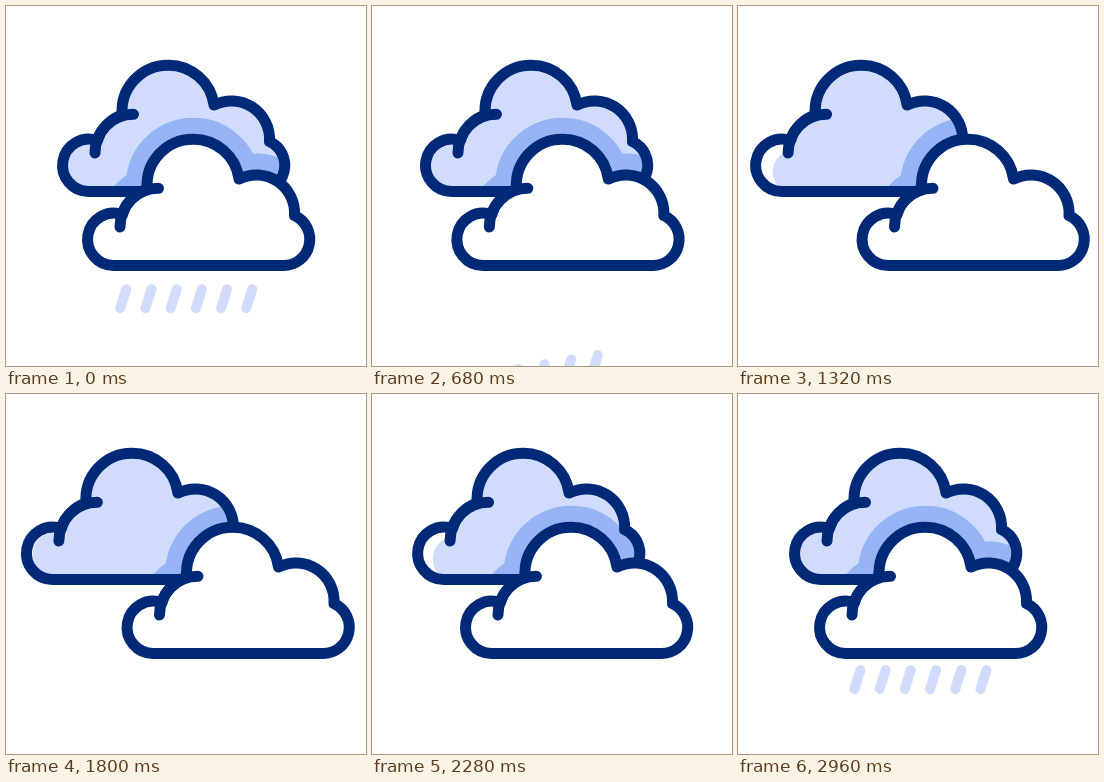
An HTML page that plays this animation: 360 by 360 pixels, repeating every 3000 ms.

```html
<!DOCTYPE html>
<html>
<head>
<meta charset="utf-8">
<style>
  html, body { margin: 0; width: 100%; height: 100%; overflow: hidden; background: #fff; }
  svg { display: block; width: 100vw; height: 100vh; }
  .line { fill: none; stroke: #002a77; stroke-width: 11; stroke-linecap: round; stroke-linejoin: round; }
</style>
</head>
<body>
<svg viewBox="0 0 360 360">
  <defs>
    <path id="body" d="M107.700 259.500A26.200 26.200 0 1 1 116.500 208.600A38.500 38.500 0 0 1 141.200 183A46 46 0 0 1 187 133.200A46 46 0 0 1 233 173A38.300 38.300 0 0 1 288.500 209.500A26.200 26.200 0 0 1 277 259.500Z"/>
    <path id="curl" d="M114 221A38.500 38.500 0 0 1 152.500 182.300"/>
    <clipPath id="backClip"><use id="clipBody" href="#body"/></clipPath>
  </defs>
  <g id="rain" stroke="#d1dcfc" stroke-width="10" stroke-linecap="round"></g>
  <g clip-path="url(#backClip)">
    <rect width="360" height="360" fill="#d1dcfc"/>
    <g id="lobe">
      <rect x="45" y="130" width="44" height="60" fill="#fff"/>
      <circle id="shade" r="22" fill="#d1dcfc"/>
    </g>
    <use id="shadow" href="#body" fill="none" stroke="#96b3f3" stroke-width="43" stroke-linejoin="round"/>
  </g>
  <g id="back" class="line"><use href="#body"/><use href="#curl"/></g>
  <g id="front" class="line"><use href="#body" fill="#fff"/><use href="#curl"/></g>
</svg>
<script>
const LOOP = 3000, DROPS = 6;
const el = id => document.getElementById(id);
const clamp = u => Math.max(0, Math.min(1, u));
const smooth = u => (u = clamp(u), u * u * (3 - 2 * u));
const move = (id, x, y) => el(id).setAttribute('transform', `translate(${x} ${y})`);

const drops = Array.from({ length: DROPS }, (_, i) => {
  const line = document.createElementNS('http://www.w3.org/2000/svg', 'line');
  const x = 120.3 + 25.2 * i;
  for (const [key, value] of Object.entries({ x1: x, y1: 283, x2: x - 6, y2: 302 })) line.setAttribute(key, value);
  el('rain').append(line);
  return line;
});

// 0 when the clouds are together, 1 when they are furthest apart
const spread = t => t < 1510 ? smooth((t - 520) / 990) : 1 - smooth((t - 1510) / 1150);

// Smooth interpolation through [time, value] stops
function track(stops, t) {
  const i = Math.max(1, stops.findIndex(s => s[0] >= t));
  const [t0, a] = stops[i - 1], [t1, b] = stops[i];
  return a + (b - a) * smooth((t - t0) / (t1 - t0));
}

// Drops slow down on the way, the right ones more
function fall(i, t) {
  const s = Math.min(t, 680);
  return 0.175 * s - (0.000065 + 0.00001 * i) * s * s + 0.12 * Math.max(0, t - 680);
}

// Width of the white gleam on the left lobe
const gleam = [[0, 1], [680, 0], [1000, 12], [1400, 13], [1800, 2], [2280, 11], [2850, 1], [3000, 1]];

function render(t) {
  const d = spread(t);
  const frontX = 47 * d, backX = -25 - 43 * d, backY = -74;
  move('front', frontX, 0);
  move('shadow', frontX, 0);
  move('back', backX, backY);
  move('clipBody', backX, backY);

  const w = track(gleam, t);
  move('lobe', -43 * d, 0);
  move('shade', 82.7 + w, 159.3 + w / 2);

  const rainTime = t > 2000 ? t - LOOP : t;
  drops.forEach((drop, i) => {
    const y = fall(i, rainTime);
    drop.setAttribute('transform', `translate(${-0.31 * y} ${y})`);
    drop.style.display = rainTime > -240 && rainTime < 1000 ? '' : 'none';
  });
}

const start = performance.now();
function tick() {
  render((performance.now() - start) % LOOP);
  requestAnimationFrame(tick);
}
tick();
</script>
</body>
</html>
```
